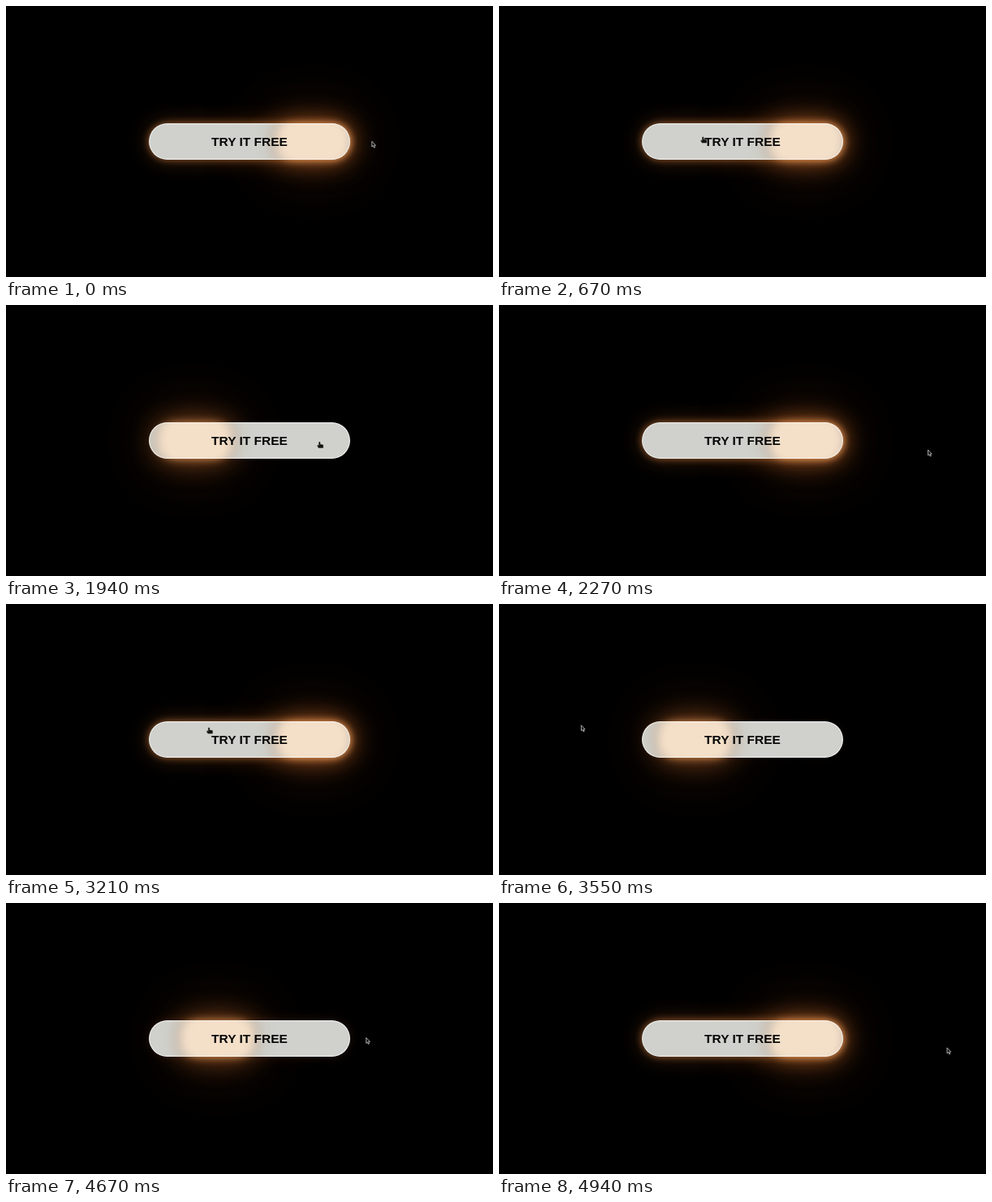
An HTML page that plays this animation: 600 by 335 pixels, repeating every 5000 ms.

```html
<!DOCTYPE html>
<html lang="en">
<head>
<meta charset="utf-8">
<title>Glow button</title>
<style>
  html, body { margin: 0; width: 100%; height: 100%; overflow: hidden; background: #000; }
  #stage { position: relative; width: 600px; height: 335px; overflow: hidden; background: #000; }
  #stage div, #stage svg { position: absolute; left: 0; top: 0; }
  #stage .pill { left: 175.7px; top: 144.7px; width: 248.6px; height: 45.4px; border-radius: 22.7px; }
  #aura {
    box-shadow: 0 0 10px rgba(222, 138, 74, .62), 0 0 28px rgba(160, 84, 34, .42);
  }
  #halo {
    width: 92px; height: 44px; margin: 145.5px 0 0 -46px; border-radius: 22px;
    background: #a0683f;
    box-shadow: 0 0 11px rgba(255, 176, 104, .74),
                0 0 36px rgba(205, 114, 52, .74),
                0 0 84px rgba(150, 74, 28, .5);
  }
  #button { overflow: hidden; background: #d0d1cc; }
  #core {
    width: 90px; height: 60px; margin: -7.3px 0 0 -45px; border-radius: 26px;
    background: #f4dfc8; filter: blur(5.5px);
    box-shadow: 0 0 15px 5px rgba(172, 122, 82, .46);
  }
  #rim {
    width: 100%; height: 100%; border-radius: inherit;
    box-shadow: inset 0 0 0 1.2px rgba(255, 255, 255, .55);
  }
  #label {
    width: 100%; text-align: center; color: #050505; white-space: nowrap;
    font: bold 15.5px/45.4px "Liberation Sans", Arial, sans-serif;
  }
  #cursor { overflow: visible; }
</style>
</head>
<body>
<div id="stage">
  <div id="aura" class="pill"></div>
  <div id="halo"></div>
  <div id="button" class="pill">
    <div id="core"></div>
    <div id="rim"></div>
    <div id="label">TRY IT FREE</div>
  </div>
  <svg id="cursor" width="10" height="12">
    <path id="arrow" d="M.5 .4V7.3L2.1 5.9L3.2 8.4L4.3 7.9L3.2 5.5H5.2Z"
          fill="#111" stroke="#c9c9c9" stroke-width=".8"/>
    <path id="hand" d="M0 0H1.3V2.8L5 3.4V7H-.6L-2 4.2L-1.2 3.8L0 4.8Z"
          fill="#15130f" stroke="#15130f" stroke-width=".5" stroke-linejoin="round"/>
  </svg>
</div>
<script>
const LOOP = 5000, STEP = LOOP / 75;
const LEFT = 232, RIGHT = 378, PILL_LEFT = 175.7, PILL_RIGHT = 424.3;

// Turning points of the pointer, and how far it sags on the way to the next
const turns = [
  { time: -700, x: 210, sag: 0 },
  { time: 90, x: 457, sag: 9 },
  { time: 1210, x: 70, sag: 9 },
  { time: 2410, x: 543, sag: 0 },
  { time: 3820, x: 55, sag: 0 },
  { time: 5095, x: 570, sag: 0 }
];

const $ = id => document.getElementById(id);
const move = (node, x, y) => node.style.transform = `translate(${x}px, ${y}px)`;
const mix = (a, b, k) => a + (b - a) * k;
const swing = u => (1 - Math.cos(Math.PI * u)) / 2;
const clamp = k => Math.min(Math.max(k, 0), 1);

function pose(t) {
  const i = turns.findIndex(turn => turn.time > t);
  const from = turns[i - 1], to = turns[i];
  const u = (t - from.time) / (to.time - from.time);
  const x = mix(from.x, to.x, swing(u));
  const y = 149 + 30 * (x / 555) ** 2.5 + from.sag * Math.sin(Math.PI * u);

  // The light changes sides late in each swing
  const k = swing(clamp((u - .6) / .24));
  const lit = to.x > from.x ? k : 1 - k;
  return { x, y, lit };
}

function draw(now) {
  // The picture advances 15 times a second
  const t = Math.floor(now % LOOP / STEP) * STEP + 7;
  const { x, y, lit } = pose(t);
  const glow = mix(LEFT, RIGHT, lit);
  const over = x > PILL_LEFT && x < PILL_RIGHT;

  $('aura').style.opacity = lit;
  move($('halo'), glow, 0);
  move($('core'), glow - PILL_LEFT, 0);
  move($('cursor'), x, y);
  $('arrow').style.display = over ? 'none' : '';
  $('hand').style.display = over ? '' : 'none';
}

const begin = performance.now();
function tick() {
  draw(performance.now() - begin);
  requestAnimationFrame(tick);
}
tick();
</script>
</body>
</html>
```
